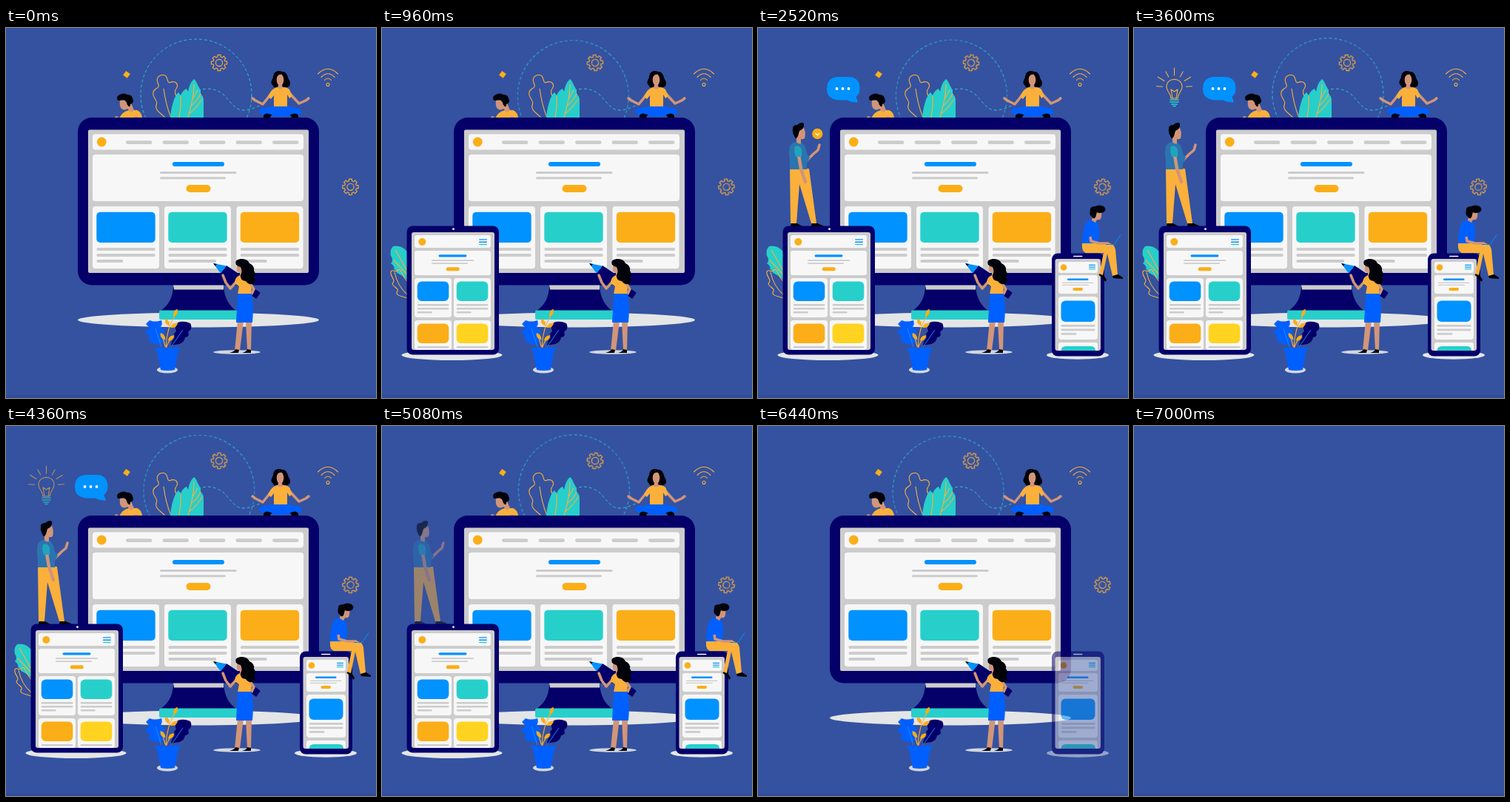
An HTML page for the animation above (8 s loop, 500 by 500 pixels).

```html
<!DOCTYPE html>
<html lang="en">
<head>
<meta charset="utf-8">
<title>Responsive design</title>
<style>
  html, body { margin: 0; width: 100%; height: 100%; overflow: hidden; background: #3452a0; }
  svg { display: block; width: 100vw; height: 100vh; }
  .navy { fill: #050069 } .blue { fill: #0060ff } .sky { fill: #0092ff }
  .teal { fill: #27cfcb } .gold { fill: #fbae17 } .wear { fill: #fbb03b }
  .sun { fill: #ffd31f } .skin { fill: #d29578 } .ink { fill: #02020a }
  .grey { fill: #ccc } .card { fill: #f7f7f7 } .floor { fill: #e4e5e6 }
  .line { fill: none; stroke: #fbae3b; stroke-width: 1.1; stroke-linecap: round; stroke-linejoin: round }
  .limb { fill: none; stroke: #d29578; stroke-linecap: round; stroke-linejoin: round }
  .dash { fill: none; stroke: #2fc0d2; stroke-width: 1; stroke-dasharray: 4 3 }
</style>
</head>
<body>
<svg viewBox="0 0 500 500" preserveAspectRatio="none">
  <rect y="496" width="500" height="4" fill="#314d99"/>

  <g id="desk">
    <circle id="orbit" class="dash" cx="257" cy="90" r="75"/>
    <path class="dash" d="M236 100C252 84 271 78 286 85C302 92 305 111 321 111C331 111 336 107 346 104"/>
    <path id="gearA" class="line"/>
    <path id="gearB" class="line"/>
    <g class="line">
      <circle cx="435" cy="76.5" r="2"/>
      <path d="M421.5 62Q435 48.500 448.500 62M426 66.500Q435 57 444 66.500M430.500 70.500Q435 65.500 439.500 70.500"/>
    </g>
    <rect class="gold" x="159.500" y="59.300" width="7" height="7" transform="rotate(35 163 62.800)"/>

    <!-- foliage behind the monitor -->
    <path class="line" d="M214 120C207 114 201 110 203 104C207 99 197 94 199 87C200 80 208 83 206 76C202 70 205 63 213 63.500C220 64 216 73 221 74C229 70 234 76 230 82C225 88 233 93 231 98C225 104 233 113 229 121M213 82Q216 104 223 121"/>
    <path class="teal" d="M222 122C223 108 227 92 233 87L236 91Q239 84 244 82L246 86Q248 74 254 69Q257 71 259 77L263 84V89Q267 92 267 98V122Z"/>
    <path class="line" d="M234 121Q237 101 236 92M246 121Q254 94 254 76M247 116Q257 109 265 96M250 105Q259 98 263 89M252 96L259 84"/>

    <!-- person peeking over -->
    <path class="wear" d="M153 122Q157 113 166 111L177 111Q184 114 184 122Z"/>
    <path class="skin" d="M154 98Q153 106 156 109Q160 112 164 109L169 114L173 111L167 97Z"/>
    <path class="ink" d="M151 98Q148 92 154 90Q159 87 164 90Q170 90 171 95Q174 101 168 103Q168 109 164 104Q163 98 158 97Q154 98 151 98Z"/>
    <path class="skin" d="M146 122Q147 118 152 120L151 122ZM172 122Q173 118 179 120V122Z"/>

    <!-- meditating woman -->
    <path class="ink" d="M361 78C356 74 360 70 361 66C362 58 368 57 373 59C381 59 380 67 383 71C386 77 382 81 377 80H366Q362 82 361 78Z"/>
    <path class="limb" stroke-width="3.500" d="M359 88L347 103L337 98L333 95M383 88L396 102L405 98L409 95"/>
    <path class="wear" d="M362 82Q366 79 370 80Q378 79 383 83L387 92L383 95L380 90V107H362V91L358 96L354 93Q357 85 362 82Z"/>
    <path class="skin" d="M366 67Q368 62 373 63Q376 67 375 73Q374 76 373 77L374 81Q371 84 367 81L368 77Q365 73 366 67Z"/>
    <path class="blue" d="M361 106H381L397 109Q402 114 397 117L371 120L346 117Q339 113 344 109Z"/>
    <path class="ink" d="M348 121Q347 116 353 115.500L359 117L357 121ZM395 121Q396 116 390 115.500L384 117L386 121Z"/>

    <!-- monitor -->
    <ellipse class="floor" cx="260" cy="394.500" rx="163" ry="10"/>
    <path class="navy" d="M226 350H294C296 366 301 376 314 384H206C219 376 225 366 226 350Z"/>
    <path class="grey" d="M226 346H294V353.500H227Z"/>
    <rect class="teal" x="207" y="381.500" width="106" height="12.500" rx="2"/>
    <rect class="navy" x="97" y="121" width="326" height="226.500" rx="19"/>
    <g id="wide"></g>
  </g>

  <g id="leaf">
    <path class="teal" d="M36 342Q28 334 20 331Q21 328 16 326Q18 323 12 318Q16 314 12 308Q10 300 15 295Q25 293 33 301L37 306Z"/>
    <path class="line" d="M34 365C26 362 19 362 20 357C25 352 14 350 14 345C20 341 10 335 12 329C16 325 17 331 20 328C26 322 27 334 30 337L36 345M17 330Q21 349 34 360M18 300L34 328M16 314L34 333"/>
  </g>
  <g id="tablet">
    <ellipse class="floor" cx="94.500" cy="442" rx="68" ry="7"/>
    <rect class="navy" x="33.500" y="267.500" width="124.500" height="174" rx="8"/>
    <circle cx="96.500" cy="271.700" r="1.400" fill="#fff"/>
  </g>

  <g id="phone">
    <ellipse class="floor" cx="432" cy="442" rx="42" ry="5.800"/>
    <rect class="navy" x="397" y="304.500" width="71" height="139" rx="8"/>
    <rect x="426" y="307.700" width="12.500" height="1.600" rx=".8" fill="#fff"/>
  </g>

  <!-- man on the tablet -->
  <g id="man">
    <path class="ink" d="M44 268L45 263H51L60 268ZM72 268L73 263H78L88 267V268Z"/>
    <path class="wear" d="M43 190H69Q73 220 79 264H72L56 211L52 264H44Z"/>
    <path class="limb" stroke-width="3.500" d="M65 180L75 170L81 165L83 158"/>
    <path d="M46 156Q52 152 59 155Q65 159 66 170L70 175L66 183V191H43Q43 179 42 172Q41 160 46 156Z" fill="#2b74b0"/>
    <path class="limb" stroke-width="4.500" d="M55 172L58 190L64 208"/>
    <path d="M50 160Q57 158 59 165V174H51Q48 166 50 160Z" fill="#20a4bd"/>
    <path class="skin" d="M52 139L62 135Q65 142 63 149Q61 151 58 150V156Q54 157 52 154Z"/>
    <path class="ink" d="M47 137Q46 131 53 131Q58 126 62 129Q63 136 56 139L54 146Q52 151 50 148Q46 142 47 137Z"/>
  </g>
  <g id="ball">
    <circle class="gold" cx="80.300" cy="143" r="7.200"/>
    <path d="M77.500 142L80.300 145L83.200 142" fill="none" stroke="#fff" stroke-width="1.200"/>
  </g>

  <g id="chat">
    <path class="sky" d="M110 66H122Q137.500 66 137.500 82Q137.500 89 132.500 93L135 100.500Q126 101 121 97.500H110Q93 97 93 82Q93 66 110 66Z"/>
    <g fill="#fff"><circle cx="106.500" cy="82" r="1.900"/><circle cx="114.500" cy="82" r="1.900"/><circle cx="122.500" cy="82" r="1.900"/></g>
  </g>

  <g id="bulb">
    <path class="line" d="M50 95C50 88 44 86 44 79.500C44 66 65 66 65 79.500C65 86 59 88 59 95ZM52 95L50 83L54.500 86L59 83L57 95"/>
    <path d="M49 97H60M49 100H60M51 103H58M53 105.500H56" fill="none" stroke="#27cfcb" stroke-width="1.700" stroke-linecap="round"/>
    <path id="rays" class="line"/>
  </g>

  <!-- man on the phone -->
  <g id="sitter">
    <path class="ink" d="M460 333L465 331L471 340L470 343ZM479 335L485 332L493 337V339L480 338Z"/>
    <path class="wear" d="M438 291L471 290Q482 291 483 299L486 333L479 335L472 305L466 334L461 332L467 304H443Q437 302 438 291Z"/>
    <path class="blue" d="M444 262Q450 257 456 260Q461 265 461 276L460 291H438Q439 268 444 262Z"/>
    <path class="limb" stroke-width="3.500" d="M448 276L450 288L461 291H473"/>
    <path class="blue" d="M442 268Q447 263 452 269L453 281L445 283Z"/>
    <path class="skin" d="M453 248L464 247Q465 254 463 258Q460 260 458 259L456 263L451 260Z"/>
    <path class="ink" d="M449 247Q448 241 456 241Q461 238 467 241Q472 245 467 249Q461 251 458 249L456 256Q453 259 451 255Q447 253 449 247Z"/>
    <path d="M470 292.500H481.500L490 279.500" fill="none" stroke="#0b87e8" stroke-width="1.200"/>
  </g>

  <g id="front">
    <!-- woman with a pencil -->
    <ellipse class="floor" cx="312" cy="438" rx="32" ry="2.800" opacity=".9"/>
    <path class="skin" d="M313 396H321L316 436H309ZM324 396H332L331 436H326Z"/>
    <path class="ink" d="M302 439Q309 437 310 434L315 435L314 439ZM319 439Q326 437 326 434L331 435V439Z"/>
    <path class="navy" d="M298 321L316 333L308 345L290 331Z"/>
    <path class="sky" d="M280 318L298 321.500L290 331.500Z"/>
    <path class="ink" d="M280 318L285 319L282.800 321.500Z"/>
    <path class="limb" stroke-width="3.500" d="M313 341L303 352L297 344L293 334"/>
    <path class="wear" d="M314 335Q321 331 328 334Q334 340 332 350L331 360H313L315 349L309 345Q309 338 314 335Z"/>
    <rect class="navy" x="332" y="354" width="10" height="10" rx="1" transform="rotate(35 337 359)"/>
    <path class="limb" stroke-width="3.500" d="M330 345L335 353L332 359"/>
    <path class="blue" d="M313 359H332Q335 377 333 398H311Z"/>
    <path class="skin" d="M312 321L321 319L322 335L316 336V330Q313 331 312 328Z"/>
    <path class="ink" d="M311 320Q308 313 317 312Q326 311 329 318Q336 321 335 328Q339 333 335 337Q340 343 333 346Q327 347 324 342Q316 341 317 334Q320 329 317 323Q314 323 311 320Z"/>

    <!-- potted plant -->
    <ellipse class="floor" cx="218" cy="462" rx="14" ry="4.500" opacity=".9"/>
    <path class="blue" d="M194 395Q201 398 210 395Q212 400 209 404Q216 407 213 412Q217 419 212 425L207 428Q200 427 192 422L195 418L187 410Q193 409 194 405L189 400Z"/>
    <path class="navy" d="M223 429Q224 421 228 419Q225 413 230 410Q227 403 232 398Q240 395 249 399Q253 406 246 411Q249 417 242 418Q241 425 234 427Z"/>
    <path d="M202 406L210 431M239 408L223 431" fill="none" stroke="#1b86ff"/>
    <path class="line" d="M216 432Q217 405 229 387M217 431Q219 424 224 419M215 430L212 418"/>
    <g id="sprigs" class="gold"></g>
    <path class="blue" d="M201 432H235L232 440L228 462Q218 464 209 462L205 440Z"/>
  </g>
</svg>

<script>
const LOOP = 8000;
const $ = id => document.getElementById(id);

function add(parent, tag, attrs) {
  const el = document.createElementNS("http://www.w3.org/2000/svg", tag);
  for (const k in attrs) el.setAttribute(k, attrs[k]);
  parent.append(el);
}
const box = (g, cls, x, y, width, height, rx = height / 2) =>
  add(g, "rect", { class: cls, x, y, width, height, rx });
const dot = (g, cx, cy, r) => add(g, "circle", { class: "gold", cx, cy, r });

// picture on top, three text lines below
function card(g, x, y, w, h, pad, pic, color, lines, thick, last) {
  box(g, "card", x, y, w, h, 4);
  box(g, color, x + pad, pic[0], w - 2 * pad, pic[1], pic[2]);
  lines.forEach((ly, i) => box(g, "grey", x + pad, ly, i < 2 ? w - 2 * pad : last, thick));
}
const menu = (g, x, y, w, gap) => {
  for (let i = 0; i < 3; i++) box(g, i < 2 ? "sky" : "teal", x, y + i * gap, w, 1.3);
};

function drawWide(g) {
  box(g, "grey", 111, 137.5, 298, 193.5, 2);
  box(g, "card", 117, 143.5, 285, 21, 4);
  dot(g, 129.3, 154, 6.4);
  for (let i = 0; i < 5; i++) box(g, "grey", 162 + i * 49.5, 152.2, 35.5, 4.8);
  box(g, "card", 117, 171, 285, 63, 4);
  box(g, "sky", 225, 181, 70, 6);
  box(g, "grey", 208, 194, 103.5, 3);
  box(g, "grey", 208, 201.3, 89, 3);
  box(g, "gold", 243.5, 212, 33, 10);
  ["sky", "teal", "gold"].forEach((c, i) =>
    card(g, [117, 214, 311.5][i], 241, 90, 84, 5.3, [248.7, 41.3, 5], c,
      [297, 305, 313], 4, i === 1 ? 65 : 36));
}

function drawTablet(g) {
  box(g, "grey", 40, 276, 112, 159, 3);
  box(g, "card", 44, 280, 103, 17, 3);
  dot(g, 54.3, 289, 5);
  menu(g, 131, 285.3, 11, 3.3);
  box(g, "card", 44, 301, 103, 33, 3);
  box(g, "sky", 76.5, 306.2, 38, 3.2);
  box(g, "grey", 67, 313.3, 57, 1.7);
  box(g, "grey", 67, 317.2, 49, 1.7);
  box(g, "gold", 86.8, 323.3, 18, 5);
  [44, 97].forEach((x, i) => {
    card(g, x, 338, 50, 53, 3.7, [342.5, 26.5, 6], ["sky", "teal"][i], [373, 378, 383], 2.5, 20);
    card(g, x, 395, 50, 40, 3.7, [399.5, 26.5, 6], ["gold", "sun"][i], [430], 2.5);
  });
}

function drawPhone(g) {
  box(g, "grey", 401.5, 312, 61.5, 124, 3);
  box(g, "card", 406, 316, 53, 15, 3);
  dot(g, 413, 323.5, 4.3);
  menu(g, 447, 319.8, 9, 2.6);
  box(g, "card", 406, 334, 53, 25, 3);
  box(g, "sky", 418, 338.5, 28.5, 2.5);
  box(g, "grey", 411, 343.8, 42.5, 1.3);
  box(g, "grey", 411, 346.8, 36, 1.3);
  box(g, "gold", 425.5, 351, 13.5, 4);
  card(g, 406, 363, 53, 58, 3.5, [368.5, 28.5, 6], "sky", [401, 406.5, 412], 2.7, 21);
  add(g, "path", { class: "card", d: "M406 436V428Q406 425 409 425H456Q459 425 459 428V436Z" });
  add(g, "path", { class: "teal", d: "M409.5 436Q410 430 416 430H450Q456 430 456 436Z" });
}

function gear(el, cx, cy) {
  const at = (a, r) => `${(cx + r * Math.sin(a)).toFixed(2)} ${(cy - r * Math.cos(a)).toFixed(2)}`;
  const pts = [];
  for (let i = 0; i < 8; i++) {
    const a = i * Math.PI / 4;
    pts.push(at(a - .25, 8.2), at(a - .18, 10.8), at(a + .18, 10.8), at(a + .25, 8.2));
  }
  el.setAttribute("d", `M${pts.join("L")}ZM${cx - 4.6} ${cy}a4.6 4.6 0 1 0 9.2 0a4.6 4.6 0 1 0 -9.2 0`);
  spin(el, cx, cy);
}

function rays() {
  let d = "";
  for (let i = -3; i <= 3; i++) {
    const a = i * Math.PI / 6.2, s = Math.sin(a), c = Math.cos(a);
    const r = i % 2 ? 24 : 26;
    d += `M${54.5 + 16 * s} ${80 - 16 * c}L${54.5 + r * s} ${80 - r * c}`;
  }
  $("rays").setAttribute("d", d);
}

const play = (el, frames) => el.animate(frames, { duration: LOOP, iterations: Infinity });

// one turn takes seven seconds, anticlockwise
function spin(el, x, y) {
  el.style.transformOrigin = `${x}px ${y}px`;
  play(el, [{ transform: "rotate(0deg)" }, { transform: `rotate(${-360 * LOOP / 7000}deg)` }]);
}
const fade = (id, steps) =>
  play($(id), steps.map(([t, opacity]) => ({ offset: t / LOOP, opacity })));
const inOut = (id, a, b, c, d) =>
  fade(id, [[0, 0], [a, 0], [b, 1], [c, 1], [d, 0], [LOOP, 0]]);

function pop(id, x, y, a, b) {
  $(id).style.transformOrigin = `${x}px ${y}px`;
  play($(id), [
    { offset: 0, transform: "scale(.4)" },
    { offset: a / LOOP, transform: "scale(.4)", easing: "ease-out" },
    { offset: b / LOOP, transform: "scale(1)" },
    { offset: 1, transform: "scale(1)" }
  ]);
}

drawWide($("wide"));
drawTablet($("tablet"));
drawPhone($("phone"));
rays();
[[229, 385, 25], [218, 398, -30], [227, 402, 60], [212, 417, -35], [223, 419, 50]].forEach(([x, y, turn]) =>
  add($("sprigs"), "path", {
    d: "M0 5.5Q-5 0 0 -6Q5 0 0 5.5Z", transform: `translate(${x} ${y}) rotate(${turn})`
  }));

gear($("gearA"), 288, 47);
gear($("gearB"), 465.5, 214.8);
spin($("orbit"), 259.5, 89.5);

for (const id of ["desk", "front"]) fade(id, [[0, 1], [6640, 1], [6980, 0], [LOOP, 0]]);
for (const row of [
  ["tablet", 80, 480, 5320, 5720],
  ["leaf", 440, 840, 4640, 5040],
  ["phone", 1000, 1400, 6280, 6640],
  ["man", 1400, 1800, 4900, 5280],
  ["chat", 2080, 2440, 4440, 4800],
  ["ball", 2160, 2480, 2840, 3120],
  ["bulb", 2880, 3280, 4240, 4600],
  ["sitter", 1800, 1960, 5960, 6320]
]) inOut(...row);

pop("chat", 115, 83, 2080, 2440);
pop("ball", 80, 143, 2160, 2480);
pop("bulb", 54, 85, 2880, 3280);
play($("sitter"), [
  { offset: 0, transform: "translateX(64px)" },
  { offset: 1800 / LOOP, transform: "translateX(64px)", easing: "ease-out" },
  { offset: 2320 / LOOP, transform: "translateX(0)" },
  { offset: 1, transform: "translateX(0)" }
]);
</script>
</body>
</html>
```
